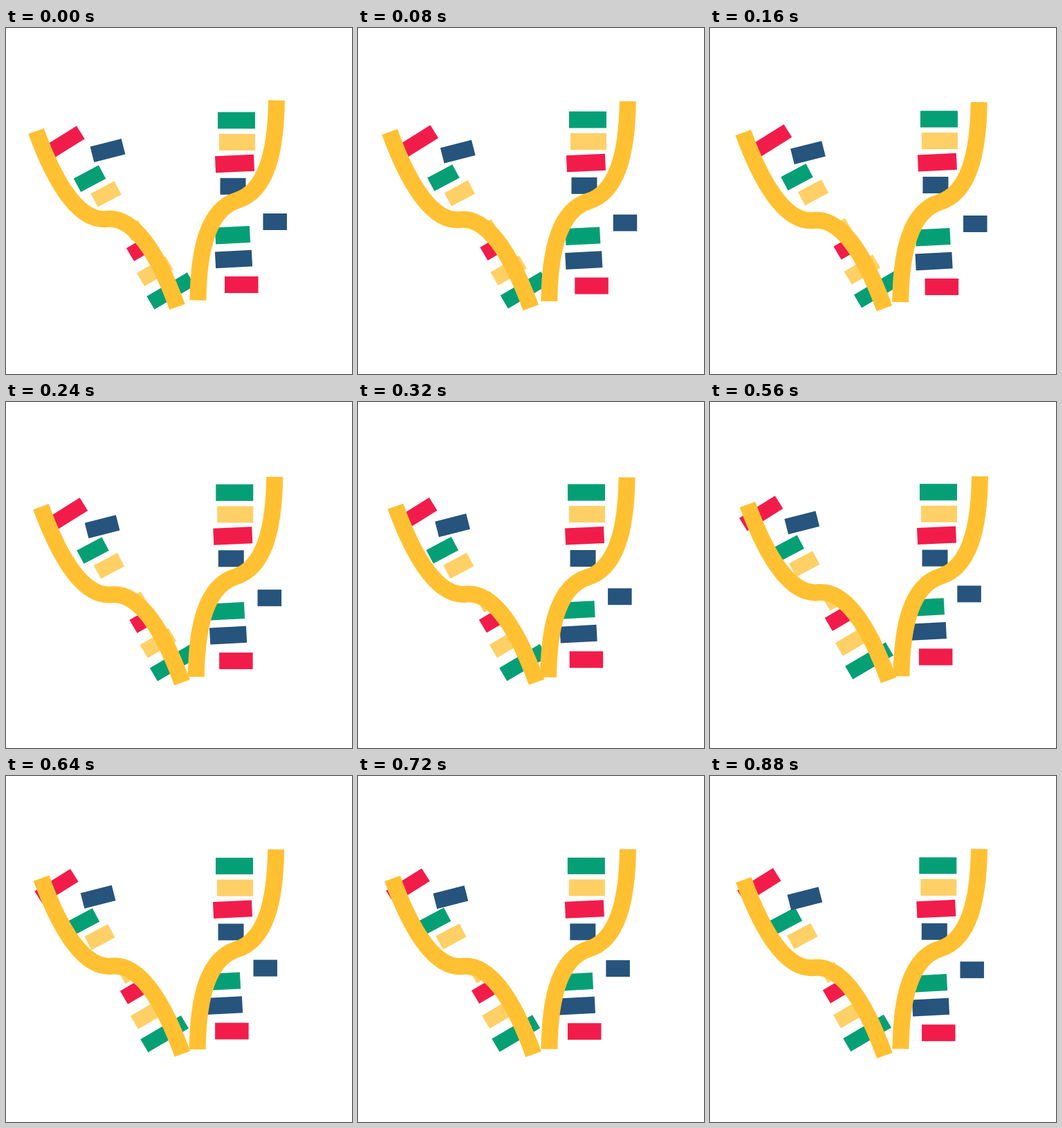
Write an HTML page with a canvas that moves like this. It is 500 px wide and 500 px high and loops after 960 ms.

```html
<!DOCTYPE html>
<html lang="en">
<head>
<meta charset="utf-8">
<title>Unzipping strands</title>
<style>
  html, body { margin: 0; width: 100%; height: 100%; overflow: hidden; background: #fff; }
  canvas { display: block; }
</style>
</head>
<body>
<canvas id="stage" width="500" height="500"></canvas>
<script>
const ctx = document.getElementById('stage').getContext('2d');
const LOOP = 960, STEP = 80, LAST = LOOP - STEP;
const RED = '#f21c4b', GREEN = '#059f76', BLUE = '#26547c', SAND = '#ffd066', GOLD = '#ffc132';

// A bar around its centre, tilted in degrees
function bar(color, x, y, length, tilt = 0, height = 24) {
  ctx.save();
  ctx.translate(x, y);
  ctx.rotate(tilt * Math.PI / 180);
  ctx.fillStyle = color;
  ctx.fillRect(-length / 2, -height / 2, length, height);
  ctx.restore();
}

const leftBar = (color, x, y, length, tilt = -30.5) => bar(color, x, y, length, tilt, 22);

// An S-curve from (cx + dx, cy + dy), point-symmetric about its centre;
// (ax, ay) and (bx, by) are the handles relative to the centre
function strand(cx, cy, dx, dy, ax, ay, bx, by) {
  ctx.beginPath();
  ctx.moveTo(cx + dx, cy + dy);
  ctx.bezierCurveTo(cx + ax, cy + ay, cx + bx, cy + by, cx, cy);
  ctx.bezierCurveTo(cx - bx, cy - by, cx - ax, cy - ay, cx - dx, cy - dy);
  ctx.strokeStyle = GOLD;
  ctx.lineWidth = 24;
  ctx.stroke();
}

function leftBars() {
  leftBar(RED, 82, 167, 61, -32);
  leftBar(GREEN, 121, 217.7, 41, -28);
  leftBar(SAND, 144.5, 240, 38.5, -28);
  leftBar(SAND, 186, 292.5, 23);
  leftBar(RED, 193.3, 319.5, 32);
  leftBar(SAND, 215.3, 351.5, 48);
  leftBar(GREEN, 238.2, 380, 68);
}

function lowerBars() {
  bar(BLUE, 147, 177, 46.5, -14.3, 23);
  bar(BLUE, 388.7, 280, 34.5);
  bar(GREEN, 327.5, 299.2, 50, -3);
  bar(BLUE, 329, 334, 53, -3);
  bar(RED, 340.3, 371, 48.5);
}

function upperBars() {
  bar(GREEN, 333, 133.5, 54);
  bar(SAND, 334, 165, 52);
  bar(RED, 330.5, 196, 56, -2.6);
  bar(BLUE, 328, 228.8, 37);
}

// Each layer wanders from rest through a few evenly spaced poses
const REST = [0, 0];
const layers = [
  { paint: leftBars, poses: [REST, [4.9, -3], [-5.5, -4.1], [-9.3, -7.6], [-11, -8.6]] },
  { paint: lowerBars, poses: [REST, [-7.3, 3.3], [-13.2, -1.9], [-13.8, -2.3], [-10, 0.2]] },
  { paint: upperBars, poses: [REST, [-2.6, -2.4], [-3, -3], [-3, -3.4], [-3.7, -4]] },
  {
    paint: () => strand(145.5, 276, -102, -127, -74, -50, -40, 4),
    poses: [REST, [6.3, 2.4], [14.1, 0.4], [7, -1.3], [5, 1]]
  },
  {
    paint: () => strand(334.2, 249, 56.8, -144.5, 55.8, -69, 41.8, -13),
    poses: [REST, [-2.7, 3.4], [-1.5, 4.5], [-0.8, 1.4], [-2, 0.8]]
  }
];

// Smooth curve through the poses, progress from 0 to 1
function wander(poses, progress, axis) {
  const end = poses.length - 1;
  const i = Math.min(Math.floor(progress * end), end - 1);
  const u = progress * end - i;
  const at = k => poses[k][axis];
  const slope = k => {
    const before = Math.max(k - 1, 0), after = Math.min(k + 1, end);
    return (at(after) - at(before)) / (after - before);
  };
  const ease = u * u * (3 - 2 * u);
  return at(i) + (at(i + 1) - at(i)) * ease
    + u * (1 - u) * (slope(i) * (1 - u) - slope(i + 1) * u);
}

function draw(progress) {
  ctx.clearRect(0, 0, 500, 500);
  for (const { paint, poses } of layers) {
    ctx.save();
    ctx.translate(wander(poses, progress, 0), wander(poses, progress, 1));
    paint();
    ctx.restore();
  }
}

const start = performance.now();
function tick() {
  const time = (performance.now() - start) % LOOP;
  draw(Math.floor(time / STEP) * STEP / LAST);
  requestAnimationFrame(tick);
}
tick();
</script>
</body>
</html>
```
